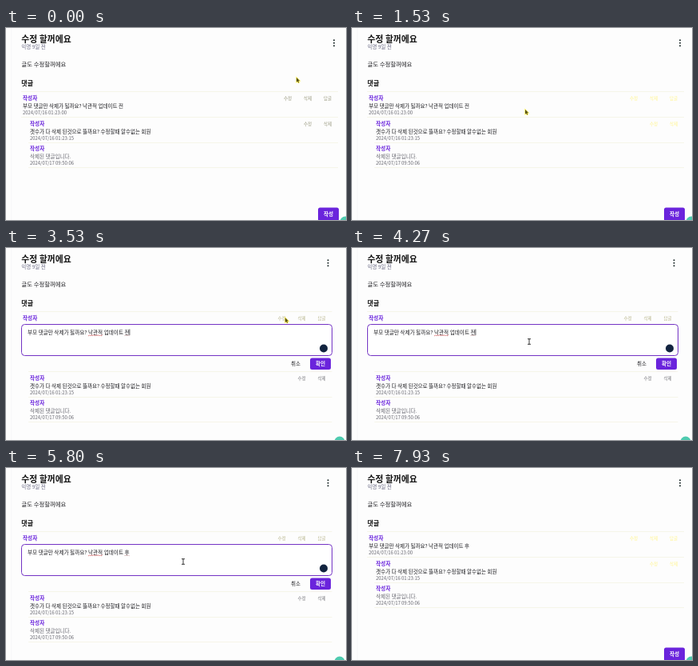
These frames come from a looping animation (426 by 240 pixels, 8 s). An HTML page with a canvas:

```html
<!DOCTYPE html>
<html lang="ko">
<head>
<meta charset="utf-8">
<title>댓글</title>
<style>
html, body { margin: 0; width: 100%; height: 100%; overflow: hidden; background: #fdfdfd; }
canvas { display: block; width: 426px; height: 240px; }
</style>
</head>
<body>
<canvas id="stage"></canvas>
<script>
const W = 426, H = 240, LOOP = 8000;
const OPEN = 3470, BLUR = 6850, SAVED = 7400;
const INK = '#1c1c20', GRAY = '#65656e', PURPLE = '#6a24dc', PALE = '#fff48a';
const FONT = '"Noto Sans CJK KR", "Noto Sans CJK", "Noto Sans", sans-serif';

const canvas = document.getElementById('stage');
const ctx = canvas.getContext('2d');
const dpr = window.devicePixelRatio || 1;
canvas.width = W * dpr;
canvas.height = H * dpr;

// Pointer stops: time, x, y
const path = [
  [0, 364, 62], [300, 364, 62], [1300, 217, 102], [1700, 217, 102],
  [2500, 378, 32], [2800, 378, 32], [3300, 351, 87], [3500, 351, 87],
  [4050, 222, 117], [6150, 222, 117], [6700, 396, 144], [6860, 396, 144],
  [7110, 434, 150], [8000, 434, 150]
];

// Text vertically centred on y; returns its width.
function text(str, x, y, size, color = INK, weight = 400) {
  ctx.font = `${weight} ${size}px ${FONT}`;
  ctx.fillStyle = color;
  ctx.fillText(str, x, y + size * 0.36);
  return ctx.measureText(str).width;
}

function box(x, y, w, h, r, fill, stroke) {
  ctx.beginPath();
  ctx.roundRect(x, y, w, h, r);
  if (fill) { ctx.fillStyle = fill; ctx.fill(); }
  if (stroke) { ctx.strokeStyle = stroke; ctx.lineWidth = 1; ctx.stroke(); }
}

function dot(x, y, r, color) {
  ctx.fillStyle = color;
  ctx.beginPath();
  ctx.arc(x, y, r, 0, Math.PI * 2);
  ctx.fill();
}

function rule(x, y, right) {
  ctx.fillStyle = '#f6f5e9';
  ctx.fillRect(x, y, right - x, 1);
}

function actions(labels, right, y, color) {
  labels.forEach((s, i) => text(s, right - 10 - 25 * (labels.length - 1 - i), y, 5.5, color));
}

function button(label, x, y, w, h) {
  box(x, y, w, h, 2.5, PURPLE);
  text(label, x + w / 2 - 6, y + h / 2, 6.6, '#fff', 700);
}

function comment(x, y, body, date, color = INK) {
  text('작성자', x, y, 6.6, PURPLE, 700);
  text(body, x, y + 10.3, 6.54, color);
  text(date, x, y + 18.7, 5.9, GRAY);
}

function wave(x, y, w, color) {
  ctx.strokeStyle = color;
  ctx.lineWidth = 0.7;
  ctx.beginPath();
  for (let i = 0; i <= w; i += 0.5) ctx.lineTo(x + i, y + 0.5 * Math.sin(i * 2.4));
  ctx.stroke();
}

function lastWord(t) {
  if (t < 4700) return '전';
  if (t < 5000) return '';
  return t < 5180 ? 'ㅎ' : '후';
}

function editor(t) {
  const focused = t < BLUR;
  if (focused) box(19.5, 95.5, 389, 39, 4, '#fff', '#7434c4');
  const y = 105.3, size = 6.62;
  const start = '부모 댓글만 삭제가 될까요? ';
  let x = 27 + text(start, 27, y, size);
  const flagged = text('낙관적', x, y, size);
  wave(x, 109.2, flagged, '#d34848');
  x += flagged + text(' 업데이트 ', x + flagged, y, size);
  const word = lastWord(t);
  const w = text(word, x, y, size);
  if (word) wave(x, 109.2, w, '#b98a8a');
  const since = t - (t < 4700 ? 4050 : t < 5180 ? 4700 : 5180);
  if (focused && since % 1060 < 530) {
    ctx.fillStyle = INK;
    ctx.fillRect(x + w, 101.5, 0.7, 7.5);
  }
  dot(398, focused ? 125.5 : 126.5, focused ? 5 : 3.5, focused ? '#12233f' : '#5b6b62');
  text('취소', 357, 145, 6.5, focused ? INK : PALE);
  button('확인', 381, 137.5, 26, 14.5);
}

function pointer(t) {
  const i = Math.max(1, path.findIndex(p => p[0] > t));
  const [t0, x0, y0] = path[i - 1], [t1, x1, y1] = path[i];
  const u = (t - t0) / (t1 - t0), e = u * u * (3 - 2 * u);
  const x = x0 + (x1 - x0) * e, y = y0 + (y1 - y0) * e;
  ctx.save();
  ctx.translate(x, y);
  if (t > 3700 && t < 6350) {
    ctx.strokeStyle = '#222';
    ctx.lineWidth = 0.9;
    ctx.stroke(new Path2D('M-2 -3.3H2M0 -3.3V3.3M-2 3.3H2'));
  } else {
    const arrow = new Path2D('M0 0V5.6L1.3 4.4L2.3 6.4L3.2 6L2.3 4H4Z');
    ctx.strokeStyle = '#fff04a';
    ctx.lineWidth = 1.2;
    ctx.stroke(arrow);
    ctx.fillStyle = t > 2300 && t < 3000 ? '#f2e52a' : '#55501c';
    ctx.fill(arrow);
  }
  ctx.restore();
}

function draw(t) {
  const editing = t >= OPEN && t < SAVED;
  const leaving = editing && t >= BLUR;
  const shift = editing ? 43 : 0;
  const right = editing ? 400.5 : 408;
  const edge = right + 8;

  ctx.setTransform(dpr, 0, 0, dpr, 0, 0);
  ctx.fillStyle = '#fdfdfd';
  ctx.fillRect(0, 0, W, H);
  ctx.fillStyle = '#f5f5f8';
  ctx.fillRect(6.5, 0, 0.7, H);

  text('수정 할꺼에요', 19.3, 14.2, 10.85, '#111', 700);
  text('익명 9일 전', 19.2, 23.8, 6.55, '#6a6a84');
  text('글도 수정할꺼에요', 19.5, 45.5, 7.35);
  text('댓글', 19.3, 69, 8, '#111', 700);
  for (const y of [15.3, 18.8, 22.3]) dot(right + 3, y, 1, leaving ? '#fff06a' : '#1c2a2a');

  rule(19, 79, edge);
  const tint = t < 900 ? '#98987e' : editing && !leaving ? '#b8b58c' : PALE;
  actions(['수정', '삭제', '답글'], right, 87.7, tint);
  if (editing) {
    text('작성자', 21, 87.3, 6.6, PURPLE, 700);
    editor(t);
  } else {
    const word = t < OPEN ? '전' : '후';
    comment(21, 87.3, `부모 댓글만 삭제가 될까요? 낙관적 업데이트 ${word}`, '2024/07/16 01:23:00');
  }

  rule(editing ? 28 : 19, 111 + shift, edge);
  actions(['수정', '삭제'], right, 120 + shift, editing ? '#77777c' : tint);
  comment(30, 119.5 + shift, '갯수가 다 삭제 된것으로 뜰까요? 수정할때 알수없는 회원', '2024/07/16 01:23:15');
  rule(28, 143 + shift, edge);
  comment(30, 150.3 + shift, '삭제된 댓글입니다.', '2024/07/17 09:50:06', GRAY);
  rule(28, 174 + shift, edge);

  if (!editing) button('작성', 391, 224.5, 26, 17);
  dot(editing ? 418 : 425, 242, 6.5, '#4fcbb0');
  pointer(t);
}

function frame(now) {
  draw(now % LOOP);
  requestAnimationFrame(frame);
}
requestAnimationFrame(frame);
</script>
</body>
</html>
```
